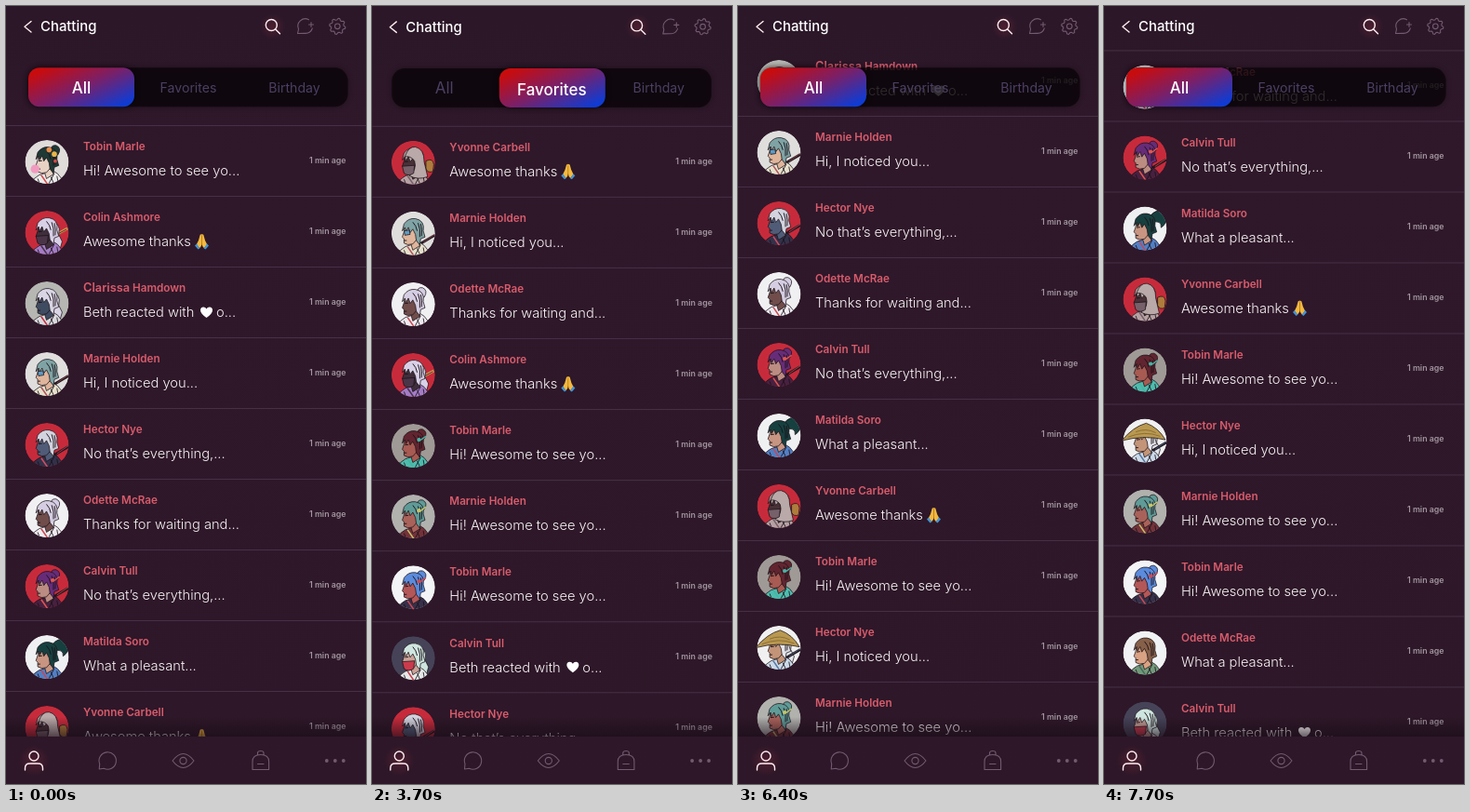
An HTML page that plays this animation: 387x836 px, repeating every 8 s.

```html
<!DOCTYPE html>
<html lang="en">
<head>
<meta charset="utf-8">
<title>Chatting</title>
<style>
  html, body { margin: 0; width: 100%; height: 100%; overflow: hidden; background: #2e182a; }
  svg { display: block; width: 387px; height: 836px; font-family: Inter, sans-serif; }
  .name { font-size: 11.7px; font-weight: 600; fill: #d85c6c; }
  .msg { font-size: 14.7px; font-weight: 300; fill: #f8f3f6; }
  .time { font-size: 8.8px; font-weight: 600; fill: #a296a0; }
  .tab { text-anchor: middle; font-size: 14.1px; fill: #4c3f63; }
  .tab.on { font-size: 17px; font-weight: 500; fill: #fff; }
  .icon { fill: none; stroke: #745a70; stroke-width: 1.1; stroke-linecap: round; stroke-linejoin: round; }
  .lit { stroke: #ffeef0; stroke-width: 1.4; }
  .ink { stroke: #1b1219; stroke-width: .8; stroke-linejoin: round; }
</style>
</head>
<body>
<svg id="stage" viewBox="0 0 387 836">
  <defs>
    <linearGradient id="back" gradientUnits="userSpaceOnUse" x1="0" x2="0" y1="0" y2="836">
      <stop stop-color="#2b1728"/><stop offset=".2" stop-color="#2f182a"/><stop offset="1" stop-color="#2d1728"/>
    </linearGradient>
    <linearGradient id="pill" x1="0" y1=".1" x2="1" y2=".9">
      <stop offset=".06" stop-color="#c80c0e"/><stop offset=".5" stop-color="#7a2068"/><stop offset=".95" stop-color="#103bd2"/>
    </linearGradient>
    <linearGradient id="fade" x2="0" y2="1">
      <stop stop-color="#190c17" stop-opacity="0"/><stop offset="1" stop-color="#190c17" stop-opacity=".65"/>
    </linearGradient>
    <radialGradient id="glow">
      <stop stop-color="#d04050" stop-opacity=".2"/><stop offset="1" stop-color="#d04050" stop-opacity="0"/>
    </radialGradient>
    <filter id="soft" x="-20%" y="-60%" width="140%" height="220%"><feGaussianBlur stdDeviation="3"/></filter>
    <clipPath id="round"><circle r="23.5"/></clipPath>
  </defs>
  <rect width="387" height="836" fill="url(#back)"/>
</svg>
<script>
const stage = document.getElementById('stage');

const path = (d, fill, more = '') => `<path d="${d}" fill="${fill}" ${more}/>`;
const inked = (d, fill) => path(d, fill, 'class="ink"');
const line = (d, color, width) => path(d, 'none', `stroke="${color}" stroke-width="${width}"`);
const dot = (x, y, r, fill) => `<circle cx="${x}" cy="${y}" r="${r}" fill="${fill}"/>`;
const text = (x, y, cls, str) => `<text x="${x}" y="${y}" class="${cls}">${str}</text>`;
const move = (x, y, body) => `<g transform="translate(${x} ${y})">${body}</g>`;

// Accessories behind and in front of an avatar's head
const behind = {
  long: a => inked('M2-16Q18-14 14 0L18 8L14 22L3 20Z', a.hair),
  pony: a => inked('M5-14Q13-27 25-20Q27-8 19-3Q20-12 8-9Z', a.hair),
  bun: a => inked('M5-13Q4-22 11-21Q18-18 13-10Z', a.hair),
  hilt: a => line('M6 3L24-7', '#d09a50', 3) + line('M8 2L23-6', '#251a20', .8),
  lamp: a => inked('M15-4Q23-8 24 0L23 8Q17 10 15 5Z', '#ae7c3c'),
  sword: a => line('M-2 16L25 0', '#221820', 3) + line('M12 8L25-1', a.accent, .7)
};
const front = {
  flowers: a => dot(3, -16, 3, '#e88c4a') + dot(9, -11, 3, '#e8b64a') + dot(10, -3, 2, '#d64a4a'),
  gum: a => dot(-13, 6, 5, '#f19ac0'),
  glasses: a => inked('M-10-5L-4-6L-3-1L-9 0Z', '#5d9cc4'),
  mask: a => inked('M-12 2L2 1L1 10Q-5 14-10 10Z', a.accent),
  hat: a => inked('M-26-2Q-13-18 2-22Q16-17 24-3Q0-9-26-2Z', '#b99850') + line('M-19-6Q0-14 18-7M-10-12Q2-17 13-11', '#7c612e', .8),
  hood: a => inked('M-9-9Q-5-21 3-20Q13-18 13-3L17 14Q6 18-4 13Q5 6 2-4Q-2-10-9-9Z', a.hair),
  clip: a => dot(7, -9, 2.2, a.accent) + line('M8-8L15-13', a.accent, 1.5)
};

const faces = [
  ['#dfdcda', '#1f3934', '#e7d2c4', '#ecebea', '#d64a4a', 'bun flowers gum'],
  ['#c72b3b', '#d8d0e6', '#3f2e3b', '#a47cc6', '#4a3548', 'hilt long mask'],
  ['#b6b7b2', '#d9d5e5', '#3f4b60', '#d9d9de', '#c03040', 'long'],
  ['#dfdedd', '#7fa3a4', '#dfb59c', '#e6e0cc', '#b0525a', 'sword glasses'],
  ['#c72b3b', '#d2d3de', '#505c77', '#33304a', '#d05060', 'sword'],
  ['#f0f0f3', '#d5cee2', '#704d4b', '#eeeaf0', '#c84a50', 'bun'],
  ['#c72b3b', '#672c78', '#bb8c82', '#482040', '#e0584e', 'bun sword clip'],
  ['#eff0f2', '#16403f', '#c79582', '#527fc4', '#c04a5a', 'pony'],
  ['#c72b3b', '#b9a9a8', '#483137', '#b6a1a3', '#766069', 'lamp hood mask'],
  ['#9f9a96', '#612530', '#a75b52', '#4dbcae', '#46b5a5', 'bun clip'],
  ['#f0f0f0', '#e4e6ec', '#c39478', '#cbd9e8', '#5577a0', 'long hat sword'],
  ['#b1b1ae', '#5f9b97', '#a9625a', '#73323a', '#c6c46a', 'bun clip'],
  ['#f3f4f6', '#5b8bdc', '#b45758', '#37304a', '#d04a55', 'bun clip'],
  ['#f1f2f3', '#866049', '#d8a283', '#72997b', '#486a58', ''],
  ['#464358', '#cfe5df', '#c9a298', '#e4e8e6', '#c93b4c', 'long mask']
].map(([bg, hair, skin, cloth, accent, extras]) => ({ bg, hair, skin, cloth, accent, extras: extras.split(' ') }));

function avatar(a) {
  const parts = set => a.extras.map(k => set[k] ? set[k](a) : '').join('');
  const figure = parts(behind) +
    inked('M-17 30L-14 17Q-9 12-2 11L9 9Q17 12 22 30Z', a.cloth) +
    inked('M-3 7L6 2L8 12L0 17Z', a.skin) +
    inked('M-9-11L-10-4L-12 2L-10 4L-10 9Q-6 12 0 10L7 2L5-13Z', a.skin) +
    inked('M-12-5L-10-13Q-5-20 3-19Q14-17 12-5L14 2L9 4L8 11L4 6L3-1L0-7L-3-3L-5-9L-8-4L-9-9Z', a.hair) +
    line('M-9-3L-5-3.500M-10 6L-7 6M6-14Q9-8 8 2M0-15Q4-11 5-5M9-13Q11-6 10 1', '#1b1219', 1) +
    line('M-6 13L3 26', a.accent, 1.6) + line('M9 11L2 24M12 14L14 25M-10 17L-7 25M5 15L9 24', '#1b1219', .9) +
    parts(front);
  return `<g clip-path="url(#round)">${dot(0, 0, 23.5, a.bg)}<g transform="translate(-.5 2) scale(.94)">${figure}</g></g>`;
}

const people = {
  tobin: 'Tobin Marle', colin: 'Colin Ashmore', marnie: 'Marnie Holden', hector: 'Hector Nye',
  clarissa: '<tspan font-size="12.8">Clarissa</tspan> Hamdown', odette: 'Odette McRae',
  calvin: 'Calvin Tull', matilda: 'Matilda Soro', yvonne: 'Yvonne Carbell'
};

const hand = path('M0-8L-1.8-7.2Q-3.200-.5-5.600 3L-2.500 7.300Q0 5 0 2Z', '#f3b93f') + path('M-5.600 2.600L-7.500 4.500L-4 8.500L-2.200 7.400Z', '#4295dc');
const praying = move(210.5, 177, hand + `<g transform="scale(-1 1)">${hand}</g>` + line('M0-6V4', '#b97a22', .6));
const heart = path('M215.5 183Q209 178.500 209 175Q209 171.500 212.200 171.500Q214.500 171.500 215.500 173.600Q216.500 171.500 218.800 171.500Q222 171.500 222 175Q222 178.500 215.500 183Z', '#fff');
const say = s => text(83, 182.3, 'msg', s);
const messages = {
  hi: say('Hi! Awesome to see yo...'),
  thanks: say('Awesome thanks') + praying,
  react: say('Beth reacted with') + heart + text(226, 182.3, 'msg', 'o...'),
  noticed: say('Hi, I noticed you...'),
  no: say('No that’s everything,...'),
  wait: say('Thanks for waiting and...'),
  what: say('What a pleasant...')
};

// Each chat: person, message, face
const chats = [
  'tobin hi 0', 'colin thanks 1', 'clarissa react 2', 'marnie noticed 3', 'hector no 4',
  'odette wait 5', 'calvin no 6', 'matilda what 7', 'yvonne thanks 8', 'tobin hi 9',
  'hector noticed 10', 'marnie hi 11', 'tobin hi 12', 'odette what 13', 'calvin react 14'
].map(s => s.split(' '));

const row = ([who, message, face]) =>
  `<rect y="128" width="387" height="1" fill="#473047"/>` +
  move(44, 167.500, avatar(faces[face])) + text(83, 155.3, 'name', people[who]) +
  messages[message] + text(326, 169, 'time', '1 min age');

const lit = (x, y, r, body) => `<circle cx="${x}" cy="${y}" r="${r}" fill="url(#glow)"/><g class="icon lit">${body}</g>`;
const bubble = '<path d="M-9 9L-8.500 3.500A9.200 9.200 0 1 1-4 8.300Z"/>';

function gear(x, y) {
  let d = '';
  for (let i = 0; i < 32; i++) {
    const r = i % 4 < 2 ? 8.6 : 6.8, a = (i + .5) * Math.PI / 16;
    d += `${i ? 'L' : 'M'}${(x + r * Math.cos(a)).toFixed(2)} ${(y + r * Math.sin(a)).toFixed(2)}`;
  }
  return `<path d="${d}Z"/><circle cx="${x}" cy="${y}" r="2.800"/>`;
}

const header =
  '<path class="icon lit" d="M27 16.500L20 22.300L27 28"/>' +
  '<text x="37" y="27.300" font-size="14.900" font-weight="500" fill="#fff">Chatting</text>' +
  lit(286.5, 22, 14, '<circle cx="285.300" cy="20.500" r="6"/><path d="M289.700 25L294.500 29.800"/>') +
  `<g class="icon"><path d="M325.500 14.700A8 8 0 0 0 314.500 25L313.500 29.500L321 29.300A8 8 0 0 0 329.300 24M328 17.500V22.500M325.500 20H330.500"/>${gear(356.3, 21.8)}</g>`;

const footer =
  lit(30, 811, 17, '<circle cx="30" cy="806" r="5"/><path d="M20.500 821V819Q20.500 814 25.500 814H34.500Q39.500 814 39.500 819V821"/>') +
  `<g class="icon">${move(109.2, 811, bubble)}
    <path d="M179 811Q190.500 796 202 811Q190.500 826 179 811Z"/><circle cx="190.500" cy="811" r="3.600"/>
    <path d="M265 820.500V812Q265 804.500 273.800 804.500Q282.600 804.500 282.600 812V820.500ZM270.500 804.500V802.500Q270.500 800.500 273.800 800.500Q277 800.500 277 802.500V804.500M270.500 814.500H277"/></g>` +
  [344.8, 353.8, 362.8].map(x => dot(x, 811, 1.9, '#745a70')).join('');

function tabBar(active, x, y, centers) {
  const px = x + [0, 115.5, 230][active];
  const box = (bx, w, r, fill, more = '') => `<rect x="${bx}" y="${y}" width="${w}" height="42" rx="${r}" fill="${fill}" ${more}/>`;
  const label = (s, i) => {
    const on = i === active;
    const size = i === 0 && !on ? 'style="font-size:17px"' : '';
    const base = y + (on ? (i ? 29.3 : 27.9) : i ? 26.2 : 27.4);
    return `<text class="tab${on ? ' on' : ''}" x="${centers[i]}" y="${base}" ${size}>${s}</text>`;
  };
  return box(x, 343.5, 14, '#0c060b', 'opacity=".3" filter="url(#soft)"') +
    box(x, 343.5, 14, '#080407', 'opacity=".76"') +
    box(px, 114, 12, '#08030a', 'opacity=".6" filter="url(#soft)"') +
    box(px, 114, 12, 'url(#pill)') + ['All', 'Favorites', 'Birthday'].map(label).join('');
}

// Header and footer backgrounds cover the ends of the list.
const covers =
  '<rect width="387" height="47" fill="url(#back)"/>' +
  '<rect y="764" width="387" height="21" fill="url(#fade)"/>' +
  '<rect y="785" width="387" height="51" fill="url(#back)"/>';

function addScreen(active, order, { x, y, barX, barY, pitch, centers }) {
  const g = document.createElementNS('http://www.w3.org/2000/svg', 'g');
  g.innerHTML =
    `<g class="list">${order.map((k, i) => move(-x / 2, y + i * pitch, row(chats[k]))).join('')}</g>` +
    covers + tabBar(active, barX, barY, centers) + move(x, x ? .4 : 0, header) + move(x, 0, footer);
  stage.append(g);
  return g;
}

const side = { x: -.7, y: .8, barX: 21.3, barY: 67, pitch: 76.06, centers: [77.7, 193.3, 308.3] };
const screens = [
  addScreen(0, chats.map((_, i) => i), { x: 0, y: 0, barX: 24, barY: 66.3, pitch: 76, centers: [81, 196, 310] }),
  addScreen(1, [8, 3, 5, 1, 9, 11, 12, 14, 4], side),
  addScreen(2, [10, 7, 6, 13, 2, 12, 0, 5, 3], side)
];
const list = screens[0].querySelector('.list');

// Start time and visible screen
const scenes = [[0, 0], [1500, 1], [2400, 2], [3700, 1], [4700, 0]];

// The list advances every 100 ms and gradually slows down.
function scrollAt(t) {
  if (t < 5500) return 0;
  const n = Math.min(22, Math.floor((t - 5500) / 100));
  return 24 + n * (27.257 - .4202 * n + .00378 * n * n);
}

function draw(t) {
  const current = scenes.filter(([start]) => start <= t).pop()[1];
  screens.forEach((g, i) => g.setAttribute('display', i === current ? 'inline' : 'none'));
  list.setAttribute('transform', `translate(0 ${-scrollAt(t)})`);
}

function frame() {
  draw(performance.now() % 8000);
  requestAnimationFrame(frame);
}
frame();
</script>
</body>
</html>
```
